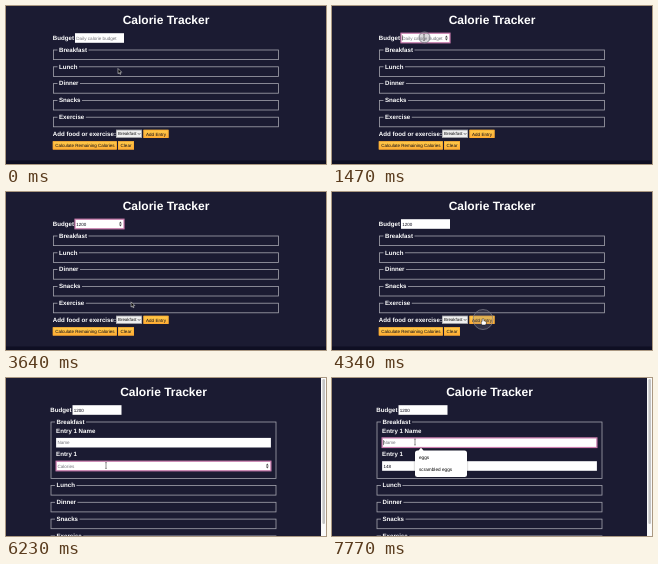
Write an HTML page with a canvas that moves like this. It is 320x158 px and loops after 8000 ms.

```html
<!DOCTYPE html>
<html lang="en">
<head>
<meta charset="utf-8">
<title>Calorie Tracker</title>
<style>
html, body { margin: 0; width: 100%; height: 100%; overflow: hidden; background: #1b1b32; }
canvas { display: block; width: 100vw; height: 100vh; }
</style>
</head>
<body>
<canvas></canvas>
<script>
const W = 320, H = 158, LOOP = 8000;
const canvas = document.querySelector('canvas');
const ctx = canvas.getContext('2d');
const FONT = '"Liberation Sans", Arial, sans-serif';
const BG = '#1b1b32', INK = '#0a0a18', FOCUS = '#cc7cae';

// Time, x, y of the pointer; it eases between neighbouring points.
const PATH = [
  [0, 112, 62.5], [70, 112, 62.5], [350, 108, 50], [490, 105, 45], [980, 92, 31.5],
  [3000, 92, 31.5], [3710, 126, 112], [4130, 151, 127], [4700, 151, 127],
  [5180, 104.5, 81.5], [5390, 104.5, 81.5], [5600, 100, 87.5],
  [7280, 100, 87.5], [7560, 83, 64]
];
const BUDGET_KEYS = [2310, 2590, 2800, 2940];
const CALORIE_KEYS = [6300, 6720, 7140];
const BUDGET_FOCUS = [1400, 4200], CALORIE_FOCUS = [5600, 7600];

const within = (t, [a, b]) => t >= a && t < b;
const typed = (word, keys, t) => word.slice(0, keys.filter(k => t >= k).length);
const caretOn = (t, start, keys) => {
  const last = [start, ...keys].filter(k => k <= t).pop();
  return Math.floor((t - last) / 500) % 2 === 0;
};

function pointerAt(t) {
  const i = PATH.findIndex(p => p[0] > t);
  if (i < 0) return PATH[PATH.length - 1].slice(1);
  const [t0, x0, y0] = PATH[i - 1], [t1, x1, y1] = PATH[i];
  const u = (t - t0) / (t1 - t0), e = u * u * (3 - 2 * u);
  return [x0 + (x1 - x0) * e, y0 + (y1 - y0) * e];
}

function text(str, x, y, size, color = '#fff', weight = 'normal', align = 'left') {
  ctx.font = `${weight} ${size}px ${FONT}`;
  ctx.textRendering = 'geometricPrecision';
  ctx.textAlign = align;
  ctx.textBaseline = 'alphabetic';
  ctx.fillStyle = color;
  ctx.fillText(str, x, y);
}

const label = (str, x, y) => text(str, x, y, 6.15, '#fff', 'bold');

function rect(x, y, w, h, fill) {
  ctx.fillStyle = fill;
  ctx.fillRect(x, y, w, h);
}

function path(points) {
  ctx.beginPath();
  points.forEach(([x, y]) => ctx.lineTo(x, y));
}

function line(points, color, width) {
  path(points);
  ctx.strokeStyle = color;
  ctx.lineWidth = width;
  ctx.stroke();
}

function fieldset(name, y, h) {
  ctx.strokeStyle = '#a3a3ad';
  ctx.lineWidth = 0.8;
  ctx.strokeRect(47.5, y, 225, h);
  ctx.font = `bold 6.15px ${FONT}`;
  rect(51.5, y - 2, ctx.measureText(name).width + 3, 4, BG);
  label(name, 53, y + 1.8);
}

function spinner(x, y) {
  ctx.fillStyle = '#444';
  for (const s of [-1, 1]) {
    path([[x - 1.4, y + s * 0.5], [x + 1.4, y + s * 0.5], [x, y + s * 2.4]]);
    ctx.fill();
  }
}

function input(x, y, w, { value = '', hint = '', focus = false, caret = false, spin = false, h = 9.6 }) {
  rect(x, y, w, h, '#fff');
  const base = y + h / 2 + 1.6;
  text(value || hint, x + 1.3, base, value ? 4.5 : 4.6, value ? INK : '#75757c');
  if (spin) spinner(x + w - 3.6, y + h / 2);
  if (caret) rect(x + 1.4 + (value ? ctx.measureText(value).width : 0), base - 4.2, 0.5, 5, '#111');
  if (focus) {
    ctx.strokeStyle = FOCUS;
    ctx.lineWidth = 1.2;
    ctx.strokeRect(x, y, w, h);
  }
}

function button(str, x, y, w) {
  const h = 8.2, g = ctx.createLinearGradient(0, y, 0, y + h);
  g.addColorStop(0, '#fecc4c');
  g.addColorStop(1, '#ffac33');
  rect(x, y, w, h, g);
  ctx.strokeStyle = '#feac32';
  ctx.lineWidth = 0.8;
  ctx.strokeRect(x + 0.4, y + 0.4, w - 0.8, h - 0.8);
  text(str, x + w / 2, y + 5.7, 4.5, INK, 'normal', 'center');
}

function select(x, y) {
  rect(x, y, 26, 8, '#efefef');
  ctx.strokeStyle = '#77777c';
  ctx.lineWidth = 0.5;
  ctx.strokeRect(x + 0.25, y + 0.25, 25.5, 7.5);
  text('Breakfast', x + 2, y + 5.5, 4.4, '#111');
  line([[x + 21.8, y + 3.3], [x + 23.1, y + 4.7], [x + 24.4, y + 3.3]], '#222', 0.6);
}

function popup() {
  ctx.save();
  ctx.shadowColor = 'rgba(0,0,0,.45)';
  ctx.shadowBlur = 2;
  ctx.fillStyle = '#fff';
  ctx.beginPath();
  ctx.roundRect(83, 72.5, 52, 26.5, 2.5);
  ctx.moveTo(86, 73);
  ctx.lineTo(89, 69.8);
  ctx.lineTo(92, 73);
  ctx.fill();
  ctx.restore();
  text('eggs', 87, 81.4, 4.7, '#000');
  text('scrambled eggs', 87, 93.4, 4.7, '#000');
}

function scrollbar() {
  rect(315, 0, 5, H, '#fafafa');
  ctx.beginPath();
  ctx.roundRect(316.4, 1, 2.6, 145, 1.3);
  ctx.fillStyle = '#c4c4c4';
  ctx.fill();
}

function arrow(x, y) {
  path([[0, 0], [0, 5.2], [1.2, 4.1], [2, 5.9], [2.9, 5.5], [2.1, 3.8], [3.7, 3.7]]
    .map(([dx, dy]) => [x + dx, y + dy]));
  ctx.closePath();
  ctx.fillStyle = '#000';
  ctx.fill();
  ctx.strokeStyle = '#fff';
  ctx.lineWidth = 0.5;
  ctx.stroke();
}

function hand(x, y) {
  ctx.beginPath();
  ctx.roundRect(x - 0.6, y, 1.3, 4, 0.6);
  ctx.roundRect(x - 1.5, y + 2.2, 4.4, 3.6, 1.1);
  ctx.strokeStyle = '#111';
  ctx.lineWidth = 0.9;
  ctx.stroke();
  ctx.fillStyle = '#fff';
  ctx.fill();
}

function beam(x, y) {
  line([[x, y - 2.8], [x, y + 2.8]], '#444', 0.6);
  for (const s of [-2.9, 2.9]) line([[x - 1, y + s], [x + 1, y + s]], '#444', 0.5);
}

function ring(x, y, r, alpha) {
  ctx.beginPath();
  ctx.arc(x, y, r, 0, 2 * Math.PI);
  ctx.fillStyle = `rgba(130,130,140,${alpha * 0.3})`;
  ctx.fill();
  ctx.strokeStyle = `rgba(125,125,135,${alpha})`;
  ctx.lineWidth = 0.9;
  ctx.stroke();
}

function pointer(t) {
  const [x, y] = pointerAt(t);
  if (within(t, [1400, 1640])) ring(92.5, 31.5, Math.min(6, 4.4 + (t - 1400) / 64), 1 - Math.max(0, t - 1500) / 140);
  if (within(t, [4200, 4480])) ring(151, 127.5, 3 + Math.min(7, (t - 4200) / 20), 0.8);
  if (within(t, [2310, 3000]) || within(t, [6300, 7280])) return;
  const page2 = t >= 4480;
  const inBudget = !page2 && x > 69 && x < 118 && y > 27 && y < 37;
  const inEntry = page2 && ((y > 83 && y < 93) || (y > 60 && y < 69.5));
  const onButton = !page2 && x > 137.5 && y > 123.5;
  if (inBudget || inEntry) beam(x, y);
  else if (onButton) hand(x, y);
  else arrow(x, y);
}

function header(t) {
  text('Calorie Tracker', 160, 17.6, 12, '#fff', 'bold', 'center');
  label('Budget', 46.8, 33.7);
  const focus = within(t, BUDGET_FOCUS);
  input(69, 27.2, 49, {
    value: typed('1200', BUDGET_KEYS, t), hint: 'Daily calorie budget',
    focus, spin: focus || within(t, [900, 1400]),
    caret: focus && caretOn(t, BUDGET_FOCUS[0], BUDGET_KEYS)
  });
}

function emptyForm() {
  ['Breakfast', 'Lunch', 'Dinner', 'Snacks', 'Exercise']
    .forEach((name, i) => fieldset(name, 44 + i * 16.8, 9.6));
  label('Add food or exercise:', 46.8, 129.7);
  select(110, 123.8);
  button('Add Entry', 137.5, 123.8, 25);
  button('Calculate Remaining Calories', 46.8, 135.3, 64);
  button('Clear', 112, 135.3, 16);
  rect(0, 154.5, W, 4, '#0f0f23');
}

function entryForm(t) {
  fieldset('Breakfast', 44, 56.5);
  const nameFocus = t >= CALORIE_FOCUS[1], focus = within(t, CALORIE_FOCUS);
  label('Entry 1 Name', 52.6, 55);
  input(52.6, 59.9, 214.8, {
    hint: 'Name', focus: nameFocus, caret: nameFocus
  });
  label('Entry 1', 52.6, 78.4);
  input(52.6, 83.2, 214.8, {
    value: typed('148', CALORIE_KEYS, t), hint: 'Calories', focus,
    spin: focus && (t < 6300 || t >= 7280) || within(t, [5500, 5600]),
    caret: focus && caretOn(t, CALORIE_FOCUS[0], CALORIE_KEYS)
  });
  ['Lunch', 'Dinner', 'Snacks', 'Exercise']
    .forEach((name, i) => fieldset(name, 107.5 + i * 16.8, 9.6));
}

function draw(t) {
  const sx = canvas.width / W, sy = canvas.height / H;
  ctx.setTransform(sx, 0, 0, sy, 0, 0);
  rect(0, 0, W, H, BG);
  const entry = t >= 4480;
  ctx.save();
  if (entry) ctx.translate(-2.5, 0);
  header(t);
  if (entry) entryForm(t);
  else emptyForm();
  ctx.restore();
  if (entry) scrollbar();
  if (t >= 7700) popup();
  pointer(t);
}

function resize() {
  const dpr = window.devicePixelRatio || 1;
  canvas.width = Math.round(innerWidth * dpr);
  canvas.height = Math.round(innerHeight * dpr);
}

const start = performance.now();
function tick() {
  draw((performance.now() - start) % LOOP);
  requestAnimationFrame(tick);
}
addEventListener('resize', resize);
resize();
tick();
</script>
</body>
</html>
```
